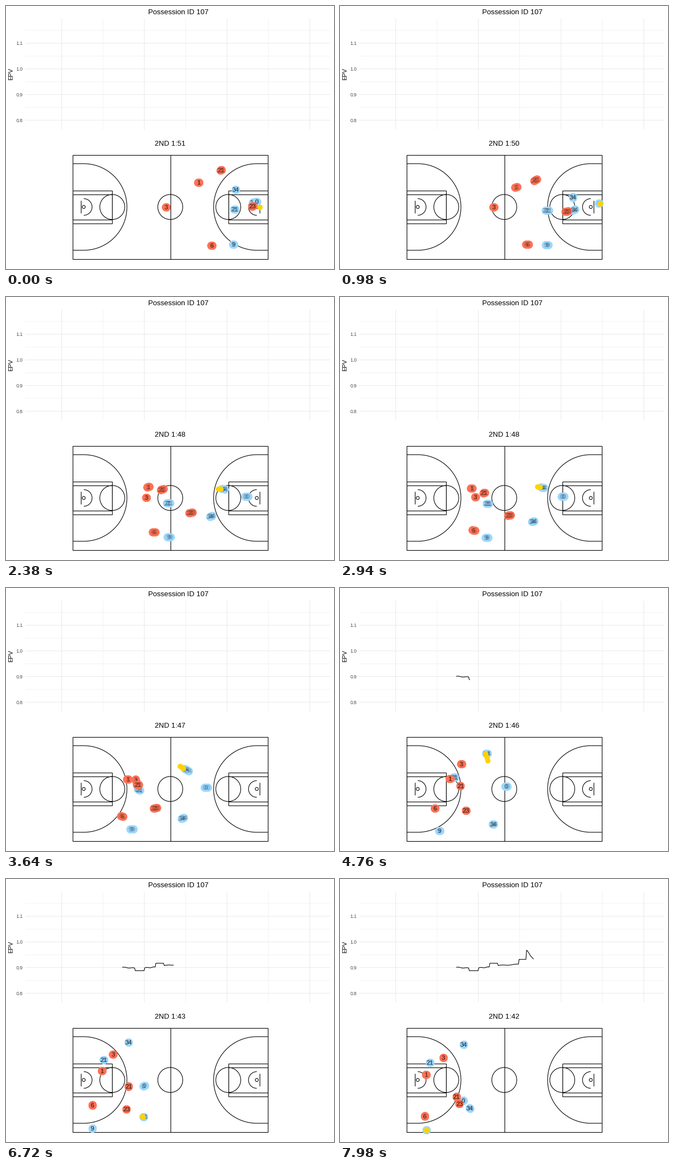
Animation, 600 px wide and 480 px high, one loop 8 s. Source, as a matplotlib script:

```python
import numpy as np
import matplotlib.pyplot as plt
from matplotlib.animation import FuncAnimation

plt.rcParams["font.family"] = "Liberation Sans"

W, H, DPI = 600, 480, 80
PX = 72 / DPI            # points per pixel
STEP, TICK, LOOP = 140, 40, 8000
NUDGE = 0.7              # keeps snapped lines on the right pixel
RED, BLUE, GOLD, GRID = "#FF7256", "#9DD8FF", "#FFD200", "#EBEBEB"
ECHO = (np.arange(4) - 1.5) / 4   # four tracking samples per step

fig = plt.figure(figsize=(W / DPI, H / DPI), dpi=DPI, facecolor="white")
ax = fig.add_axes([0, 0, 1, 1])
ax.set(xlim=(NUDGE, W + NUDGE), ylim=(H + NUDGE, NUDGE))
ax.axis("off")


def line(xs, ys, color="black", width=1.1, z=1, snap=None):
    return ax.plot(xs, ys, color=color, lw=width * PX, zorder=z, snap=snap,
                   solid_capstyle="butt")[0]


def label(x, y, text, size, **kw):
    return ax.text(x, y, text, fontsize=size * PX, va="baseline", **kw)


def grid(xs, ys, width):
    line(xs, ys, GRID, width, 0, False)


def ring(cx, cy, r, a0=0, a1=360):
    a = np.radians(np.linspace(a0, a1, 90))
    return cx + r * np.cos(a), cy + r * np.sin(a)


def box(x0, y0, x1, y1):
    line([x0, x1, x1, x0, x0], [y0, y0, y1, y1, y0])


# ---- chart panel ----
for k in range(4):
    x, y = 102.5 + 151.3 * k, 68.7 + 46.8 * k
    grid([36, 594], [y - 23.4] * 2, 0.6)
    grid([36, 594], [y] * 2, 1.1)
    grid([x] * 2, [24, 226], 1.1)
    if k < 3:
        grid([x + 75.6] * 2, [24, 226], 0.6)
    label(31.5, y + 3.4, f"{1.1 - 0.1 * k:.1f}", 8.8, ha="right", color="#4D4D4D")

label(315.6, 15.6, "Possession ID 107", 13.2, ha="center")
ax.text(9.9, 125, "EPV", fontsize=11 * PX, rotation=90, ha="center", va="center")
clock = label(301, 255.5, "", 13.2, ha="center")

# ---- court ----
MID, CY = 301.2, 367.5
box(123, 272.5, 479.5, 462.5)
line([MID] * 2, [272.5, 462.5])
line(*ring(MID, CY, 22.8))
for side in (-1, 1):
    base = MID + side * 178.3
    hoop, board, foul = (base - side * d for d in (20, 15.2, 72.2))
    turn = 90 * side
    box(base, 337.2, foul, 397.8)
    box(base, 344.8, foul, 390.3)
    line(*ring(foul, CY, 22.8))
    line(*ring(hoop, CY, 2.8))
    line(*ring(hoop, CY, 15.2, turn, turn + 180))
    xs, ys = ring(hoop, CY, 79, turn, turn + 180)
    line([base, *xs, base], [ys[0], *ys, ys[-1]])
    line([board] * 2, [CY - 11.4, CY + 11.4])


# ---- motion ----
def glide(ts, ps):
    """Monotone cubic through the points, slower at both ends."""
    ts, ps = np.array(ts, float), np.array(ps, float)
    h = np.diff(ts)
    d = np.diff(ps) / h
    m = np.zeros(len(ts))
    m[0], m[-1] = 0.45 * d[0], 0.3 * d[-1]
    for i in range(1, len(d)):
        if d[i - 1] * d[i] > 0:
            m[i] = 2 * d[i - 1] * d[i] / (d[i - 1] + d[i])

    def at(t):
        c = np.clip(t, ts[0], ts[-1])
        i = np.clip(np.searchsorted(ts, c, "right") - 1, 0, len(h) - 1)
        u = (c - ts[i]) / h[i]
        p = ((1 + 2 * u) * (1 - u) ** 2 * ps[i] + u * u * (3 - 2 * u) * ps[i + 1]
             + h[i] * u * (1 - u) * ((1 - u) * m[i] - u * m[i + 1]))
        return p + (t - c) * np.where(t < c, m[0], m[-1])
    return at


RUN = (0, 21, 34, 48, 57)          # start, midcourt, arrival, set, end
INBOUND = (0, 10) + RUN[1:]


def path(*pts):
    ts = RUN if len(pts) == len(RUN) else INBOUND
    fx, fy = (glide(ts, c) for c in zip(*pts))
    return lambda t: np.column_stack([fx(t), fy(t)])


wing = path((453, 359), (354, 410), (281, 432), (252.5, 435), (238, 419))
guard = path((420.5, 335.5), (428, 353), (371, 348.5), (269, 302.5), (225, 299), (226.5, 303))
post = path((419, 372), (271, 377.5), (210, 346), (179.5, 331), (165, 336))
corner = path((416.5, 436), (269, 439.5), (182.5, 443.5), (158.5, 455.5), (158.5, 459))
center = path((459, 358), (478, 362), (408, 365), (305, 363), (253, 378), (226, 405))

home = {
    "3": path((293.5, 367.5), (248, 366), (222.5, 322), (196.5, 321), (189.5, 327)),
    "1": path((353, 322.5), (241, 349.5), (201.5, 349), (176, 351), (158, 358)),
    "6": path((377, 438), (245, 426.5), (174, 403), (158.5, 413.5), (155.5, 433.5)),
    "21": path((394, 300), (264, 358), (221, 362), (225, 379), (213.5, 398)),
    "23": path((451.5, 366), (310, 399), (231, 406.5), (221, 421), (219, 411)),
}

# each pass: leaves at, arrives at, receiver
PASSES = [(2, 6, center), (9, 12, guard), (33.6, 37, center),
          (41, 44, wing), (51.5, 54.2, corner)]


def ball(t):
    """Starts under the hoop, then runs one step ahead of whoever holds it."""
    pos = np.array([465, 368])
    for t0, t1, who in PASSES:
        k = np.clip((t - t0) / (t1 - t0), 0, 1)[:, None]
        pos = pos * (1 - k) + who(t + 1) * k
    return pos


class Mover:
    def __init__(self, z, color, size, num, route):
        self.route = route
        self.dots = ax.scatter([0] * 4, [0] * 4, s=(size * PX) ** 2, c=color,
                               linewidths=0, zorder=z)
        self.tags = [label(0, 0, num, 11.4, ha="center", alpha=0.3, zorder=z + 0.5)
                     for _ in ECHO if num]

    def place(self, step):
        pts = self.route(step + ECHO)
        self.dots.set_offsets(pts)
        for tag, (x, y) in zip(self.tags, pts):
            tag.set_position((x, y + 4.1))


away = zip(("34", "34", "21", "9", "0"), (wing, guard, post, corner, center))
movers = [Mover(10 + k, BLUE, 15, *p) for k, p in enumerate(away)]
movers += [Mover(20 + k, RED, 15, *p) for k, p in enumerate(home.items())]
movers.append(Mover(30, GOLD, 9.5, "", ball))

# ---- value curve: flat while a pass is in the air, wavering while held ----
FIRST = 28.9
marks = [FIRST] + [t for p in PASSES[2:] for t in p[:2]] + [57.1]
spans = [(0.901, 0.898), (0.888, 0.888), (0.899, 0.902), (0.917, 0.917),
         (0.908, 0.913), (0.932, 0.932), (0.968, 0.929)]
times, values = [], []
for t0, t1, (v0, v1) in zip(marks, marks[1:], spans):
    u = np.linspace(0, 1, 16)
    waver = 0.0012 * np.sin(9 * u) * (v0 != v1)
    times.extend(t0 + 0.25 + (t1 - t0 - 0.25) * u)
    values.extend(v0 + (v1 - v0) * u + waver)
EX = 212 + 5.09 * (np.array(times) - FIRST)
EY = 162.4 - 468 * (np.array(values) - 0.9)
curve = line([], [], z=5)


def draw(i):
    step = (i * TICK + TICK // 2) // STEP
    left = 111.56 - 0.16 * step
    clock.set_text(f"2ND {int(left // 60)}:{int(left % 60):02d}")
    for m in movers:
        m.place(step)
    seen = EX <= 212 + 5.09 * (step - FIRST) + 0.5
    curve.set_data(EX[seen], EY[seen])
    return []


anim = FuncAnimation(fig, draw, frames=LOOP // TICK, interval=TICK,
                     repeat=True, repeat_delay=0, blit=False)
plt.show()
```
